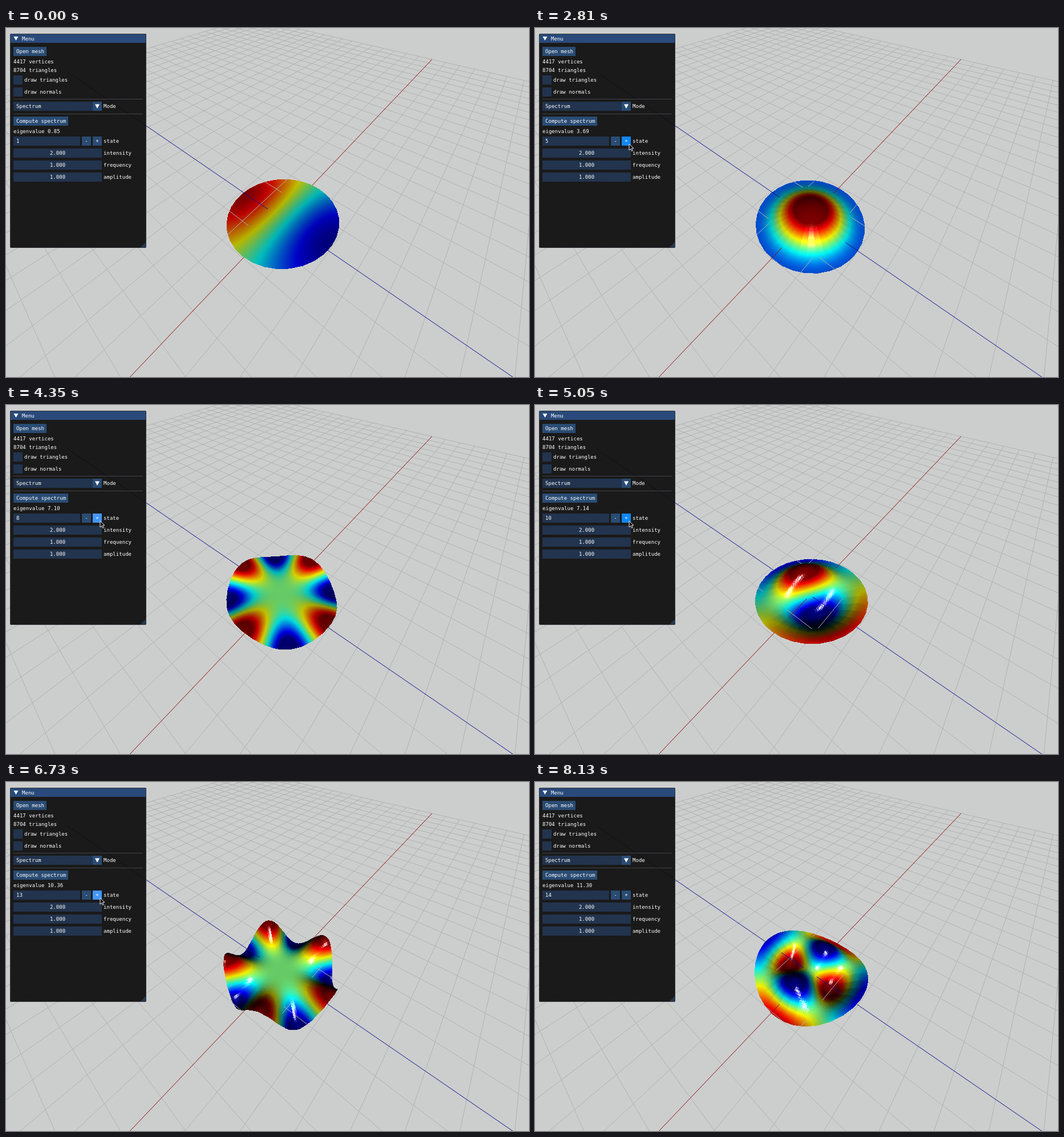
These frames come from a looping animation (917x611 px, 8200 ms). An HTML page with a canvas:

```html
<!DOCTYPE html>
<html lang="en">
<head>
<meta charset="utf-8">
<title>Spectrum viewer</title>
<style>
html, body { margin: 0; width: 100%; height: 100%; overflow: hidden; background: #cccecd; }
canvas { display: block; }
</style>
</head>
<body>
<canvas id="stage" width="917" height="611"></canvas>
<script>
const W = 917, H = 611, LOOP = 8200, RAD = Math.PI / 180;
const ctx = document.getElementById('stage').getContext('2d');

// Camera space: x right, y down, z forward
const FOCAL = 365, CX = 458.5, CY = 305.5;
const ORIGIN = [0.4971, 0.5768, 7.66];
const AXIS_U = [0.6437, -0.6095, 0.4630];
const AXIS_V = [0.7665, 0.5125, -0.3893];
const AXIS_UP = [0, -0.6049, -0.7963];
const GRID = 20, RADIUS = 2, LIFT = 0.13;

const place = (u, v, h) => ORIGIN.map((o, i) => o + u * AXIS_U[i] + v * AXIS_V[i] + h * AXIS_UP[i]);
const project = p => [CX + FOCAL * p[0] / p[2], CY + FOCAL * p[1] / p[2]];
const clamp01 = x => x < 0 ? 0 : x > 1 ? 1 : x;

// Vibration modes of a free disk: start, eigenvalue, order, root, angle, anchor time, phase there
const STATES = [
  [0, '0.85', 1, 1.8412, -90, 0, -35],
  [760, '0.85', 1, 1.8412, 0, 760, 20],
  [1300, '2.34', 2, 3.0542, -60, 1920, 16],
  [2200, '2.35', 2, 3.0542, -15, 2200, 50],
  [2740, '3.69', 0, 3.8317, 0, 2740, 120],
  [3300, '4.43', 3, 4.2012, 10, 3720, -60],
  [3860, '4.44', 3, 4.2012, -20, 3860, -50],
  [4250, '7.10', 4, 5.3176, 0, 4250, 0],
  [4600, '7.11', 4, 5.3176, 22.5, 4600, 40],
  [4980, '7.14', 1, 5.3314, -60, 5050, 66],
  [5520, '7.15', 1, 5.3314, 30, 6100, 6],
  [6250, '10.35', 5, 6.4156, 0, 6250, 30],
  [6620, '10.36', 5, 6.4156, 18, 6620, 80],
  [7000, '11.30', 2, 6.7061, 86, 7290, 144]
].map(([start, label, order, root, angle, anchor, phase], i) =>
  ({ start, label, order, root, angle: angle * RAD, anchor, phase: phase * RAD, id: i + 1 }));

function bessel(m, x) {
  const n = 60;
  let sum = 0;
  for (let i = 0; i < n; i++) {
    const a = (i + 0.5) * Math.PI / n;
    sum += Math.cos(m * a - x * Math.sin(a));
  }
  return sum / n;
}

// Polar mesh whose rim is a 32-sided polygon
const RINGS = 34, SECTORS = 128, SIDE = Math.PI / 16;
const rimScale = Array.from({ length: SECTORS }, (_, j) => {
  const a = (j * 2 * Math.PI / SECTORS) % SIDE - SIDE / 2;
  return Math.cos(SIDE / 2) / Math.cos(a);
});
for (const s of STATES) {
  const edge = bessel(s.order, s.root);
  const area = (s.order ? 1 : 2) * Math.PI * RADIUS * RADIUS / 2;
  const norm = 1 / Math.sqrt(area * (1 - (s.order / s.root) ** 2) * edge * edge);
  s.radial = Array.from({ length: RINGS + 1 }, (_, i) => norm * bessel(s.order, s.root * i / RINGS));
}

function layer(w, h) {
  const c = document.createElement('canvas');
  c.width = w;
  c.height = h;
  return c.getContext('2d', { willReadFrequently: true });
}

function floorLine(g, a, b, color) {
  const near = 0.2;
  let p = place(...a, 0), q = place(...b, 0);
  if (p[2] < near && q[2] < near) return;
  if (p[2] > q[2]) [p, q] = [q, p];
  if (p[2] < near) {
    const k = (near - p[2]) / (q[2] - p[2]);
    p = p.map((c, i) => c + (q[i] - c) * k);
  }
  g.strokeStyle = color;
  g.beginPath();
  g.moveTo(...project(p));
  g.lineTo(...project(q));
  g.stroke();
}

function drawFloor(g) {
  g.lineWidth = 1;
  for (let i = -GRID; i <= GRID; i++) {
    if (!i) continue;
    floorLine(g, [i, -GRID], [i, GRID], '#b0b2b1');
    floorLine(g, [-GRID, i], [GRID, i], '#b0b2b1');
  }
  floorLine(g, [-GRID, 0], [GRID, 0], '#8c0f0f');
  floorLine(g, [0, -GRID], [0, GRID], '#12128c');
}

// Panel
const BUTTON = 'rgba(66,150,250,.4)', FIELD = 'rgba(41,74,122,.54)';
function box(g, x, y, w, h, color) {
  g.fillStyle = color;
  g.fillRect(x, y, w, h);
}
function text(g, s, x, y, align = 'left') {
  g.font = '9.05px "DejaVu Sans Mono", monospace';
  g.textAlign = align;
  g.fillStyle = '#fff';
  g.fillText(s, x, y + 3);
}
function triangle(g, color, ...pts) {
  g.fillStyle = color;
  g.beginPath();
  pts.forEach(p => g.lineTo(...p));
  g.fill();
}
function drawPanel(g) {
  g.beginPath();
  g.roundRect(7, 10, 239, 375, 2);
  g.fillStyle = 'rgba(15,15,15,.94)';
  g.fill();
  g.strokeStyle = 'rgba(80,80,95,.5)';
  g.lineWidth = 1;
  g.beginPath();
  g.roundRect(7.5, 10.5, 238, 374, 2);
  g.stroke();
  box(g, 8, 11, 237, 15, '#294a7a');
  triangle(g, '#fff', [13.5, 15], [21.5, 15], [17.5, 22]);
  text(g, 'Menu', 28, 18.5);
  box(g, 13, 33, 58, 16, BUTTON);
  text(g, 'Open mesh', 18, 41);
  text(g, '4417 vertices', 13, 58.5);
  text(g, '8704 triangles', 13, 73.5);
  ['draw triangles', 'draw normals'].forEach((s, i) => {
    box(g, 13, 83 + 21 * i, 16, 16, FIELD);
    text(g, s, 32, 91 + 21 * i);
  });
  for (const y of [124, 150]) box(g, 13, y, 227, 1, 'rgba(110,110,128,.5)');
  box(g, 13, 129, 139, 16, FIELD);
  box(g, 152, 129, 16, 16, BUTTON);
  triangle(g, '#fff', [156, 133.5], [164, 133.5], [160, 141]);
  text(g, 'Spectrum', 18, 137);
  text(g, 'Mode', 171, 137);
  box(g, 13, 155, 96, 16, BUTTON);
  text(g, 'Compute spectrum', 18, 163);
  box(g, 13, 190, 117, 16, FIELD);
  box(g, 133, 190, 16, 16, BUTTON);
  text(g, '-', 141, 198, 'center');
  text(g, 'state', 171, 198);
  [['intensity', '2.000'], ['frequency', '1.000'], ['amplitude', '1.000']].forEach(([s, n], i) => {
    const y = 211 + 21 * i;
    box(g, 13, y, 155, 16, FIELD);
    text(g, n, 90.5, y + 8, 'center');
    text(g, s, 171, y + 8);
  });
  triangle(g, 'rgba(66,150,250,.25)', [245, 375], [245, 384], [236, 384]);
}

const ink = layer(W, H);
drawFloor(ink);
const base = layer(W, H);
box(base, 0, 0, W, H, '#cccecd');
base.drawImage(ink.canvas, 0, 0);
drawPanel(base);

// Software rasteriser for the disk
const TX = 370, TY = 230, TW = 230, TH = 215;
const tile = layer(TW, TH);
const image = tile.createImageData(TW, TH);
const inkData = ink.getImageData(TX, TY, TW, TH).data;
const depth = new Float32Array(TW * TH);

function paint(at, phi, height, diffuse, shine) {
  const t = 4 * clamp01(0.5 + phi), o = at * 4;
  const cover = height < 0 ? inkData[o + 3] / 255 : 0;
  for (let c = 0; c < 3; c++) {
    const jet = clamp01(1.5 - Math.abs(t - 3 + c));
    const lit = 255 * clamp01(jet * diffuse + shine);
    image.data[o + c] = lit + (inkData[o + c] - lit) * cover;
  }
  image.data[o + 3] = 255;
}

function fillFace(a, b, c) {
  const area = (b.x - a.x) * (c.y - a.y) - (c.x - a.x) * (b.y - a.y);
  if (Math.abs(area) < 1e-6) return;
  const [e, f] = [b, c].map(q => q.p.map((k, i) => k - a.p[i]));
  const n = [e[1] * f[2] - e[2] * f[1], e[2] * f[0] - e[0] * f[2], e[0] * f[1] - e[1] * f[0]];
  const up = n[1] * AXIS_UP[1] + n[2] * AXIS_UP[2];
  // Parallel light along the camera's viewing axis
  const diffuse = Math.max(0, -n[2] * Math.sign(up) / Math.hypot(...n));
  const shine = diffuse ** 200;
  const x0 = Math.max(0, Math.ceil(Math.min(a.x, b.x, c.x)));
  const x1 = Math.min(TW - 1, Math.floor(Math.max(a.x, b.x, c.x)));
  const y0 = Math.max(0, Math.ceil(Math.min(a.y, b.y, c.y)));
  const y1 = Math.min(TH - 1, Math.floor(Math.max(a.y, b.y, c.y)));
  for (let y = y0; y <= y1; y++) {
    for (let x = x0; x <= x1; x++) {
      const wb = ((x - a.x) * (c.y - a.y) - (c.x - a.x) * (y - a.y)) / area;
      const wc = ((b.x - a.x) * (y - a.y) - (x - a.x) * (b.y - a.y)) / area;
      const wa = 1 - wb - wc;
      if (wa < -1e-6 || wb < -1e-6 || wc < -1e-6) continue;
      const z = wa * a.p[2] + wb * b.p[2] + wc * c.p[2];
      const at = y * TW + x;
      if (z >= depth[at]) continue;
      depth[at] = z;
      paint(at, wa * a.phi + wb * b.phi + wc * c.phi, wa * a.h + wb * b.h + wc * c.h, diffuse, shine);
    }
  }
}

function drawDisk(state, time) {
  const swing = Math.sin(state.phase + state.root / RADIUS * (time - state.anchor) / 1000);
  image.data.fill(0);
  depth.fill(1e9);
  const rows = [];
  for (let i = 0; i <= RINGS; i++) {
    const row = [];
    for (let j = 0; j < SECTORS; j++) {
      const angle = j * 2 * Math.PI / SECTORS;
      const r = RADIUS * i / RINGS * rimScale[j];
      const phi = state.radial[i] * Math.cos(state.order * (angle - state.angle));
      const h = LIFT + swing * phi;
      const p = place(r * Math.cos(angle), r * Math.sin(angle), h);
      const [x, y] = project(p);
      row.push({ p, phi, h, x: x - TX - 0.5, y: y - TY - 0.5 });
    }
    rows.push(row);
  }
  for (let i = 0; i < RINGS; i++) {
    for (let j = 0; j < SECTORS; j++) {
      const k = (j + 1) % SECTORS;
      fillFace(rows[i][j], rows[i + 1][j], rows[i + 1][k]);
      fillFace(rows[i][j], rows[i + 1][k], rows[i][k]);
    }
  }
  tile.putImageData(image, 0, 0);
  ctx.drawImage(tile.canvas, TX, TY);
}

// Pointer path: time, x, y
const PATH = [[90, 800, 611], [330, 520, 440], [560, 190, 225], [680, 165, 203],
  [7360, 165, 203], [7500, 430, 310], [7640, 764, 516], [7860, 889, 612]];
function pointerAt(t) {
  const i = PATH.findIndex(k => k[0] > t);
  if (i < 1) return null;
  const [a, b] = [PATH[i - 1], PATH[i]];
  const k = (t - a[0]) / (b[0] - a[0]);
  return [a[1] + (b[1] - a[1]) * k, a[2] + (b[2] - a[2]) * k];
}
function drawPointer(x, y) {
  ctx.save();
  ctx.translate(x, y);
  ctx.beginPath();
  [[0, 0], [0, 11], [2.6, 8.6], [4.6, 12.6], [6.4, 11.7], [4.5, 7.9], [8, 7.7]].forEach(p => ctx.lineTo(...p));
  ctx.closePath();
  ctx.fillStyle = '#111';
  ctx.fill();
  ctx.strokeStyle = '#e8e8e8';
  ctx.lineWidth = 1;
  ctx.stroke();
  ctx.restore();
}

function render(t) {
  const state = STATES.filter(s => s.start <= t).pop();
  const pointer = pointerAt(t);
  const hover = pointer && pointer[0] >= 152 && pointer[0] < 168 && pointer[1] >= 190 && pointer[1] < 206;
  const pressed = state.id > 1 && t - state.start < 100;
  ctx.drawImage(base.canvas, 0, 0);
  drawDisk(state, t);
  box(ctx, 152, 190, 16, 16, pressed ? '#0f87fa' : hover ? '#4296fa' : BUTTON);
  text(ctx, '+', 160, 198, 'center');
  text(ctx, 'eigenvalue ' + state.label, 13, 181);
  text(ctx, String(state.id), 18, 198);
  if (pointer) drawPointer(...pointer);
}

const began = performance.now();
function tick() {
  render((performance.now() - began) % LOOP);
  requestAnimationFrame(tick);
}
tick();
</script>
</body>
</html>
```
